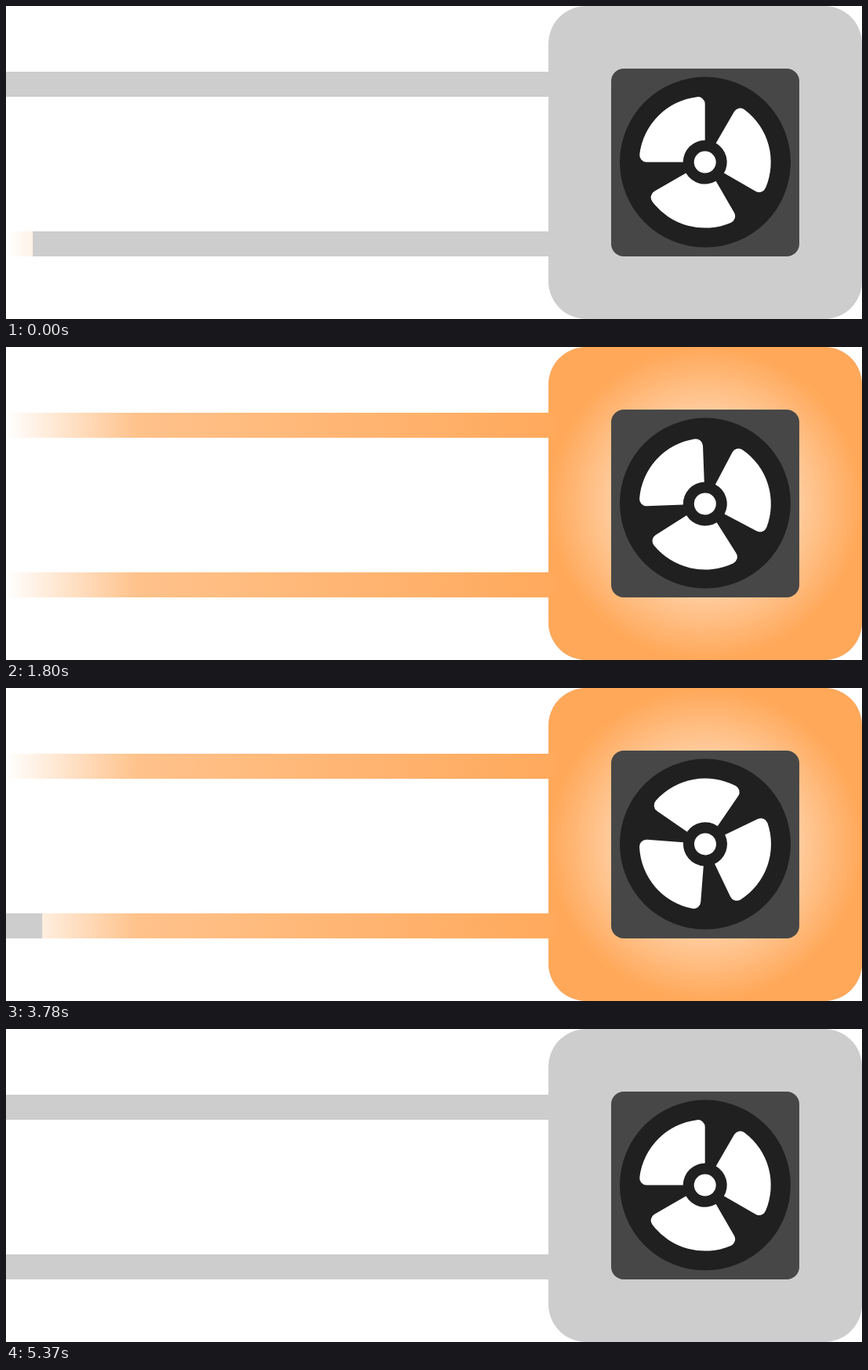
Recreate the animation shown at these times as an HTML page. Size 1092 by 400 pixels, loop 5.4 s.

```html
<!DOCTYPE html>
<html lang="en">
<head>
<meta charset="utf-8">
<title>Heat flow through a fan</title>
<style>
  html, body { margin: 0; width: 100%; height: 100%; overflow: hidden; background: #fff; }
  svg { display: block; width: 100%; height: 100%; }
</style>
</head>
<body>
<svg viewBox="0 0 1092 400">
  <defs>
    <linearGradient id="barHeat" gradientUnits="userSpaceOnUse" x1="0" x2="700" y1="0" y2="0">
      <stop offset="0" stop-color="#fff"/>
      <stop offset=".24" stop-color="#ffc28b"/>
      <stop offset="1" stop-color="#ffa95c"/>
    </linearGradient>
    <radialGradient id="boxHeat" gradientUnits="userSpaceOnUse" cx="892" cy="200" r="200">
      <stop offset="0" stop-color="#fff"/>
      <stop offset="1" stop-color="#ffa859"/>
    </radialGradient>
    <clipPath id="boxShape"><rect x="692" width="400" height="400" rx="48"/></clipPath>
    <path id="blade" d="M0-28V-74.5A9 9 0 0 0-10.1-83.4A84 84 0 0 0-83.4-10.1A9 9 0 0 0-74.5 0H-28A28 28 0 0 1 0-28Z"/>
  </defs>

  <g fill="#cdcdcd">
    <rect y="84" width="700" height="32"/>
    <rect y="288" width="700" height="32"/>
    <rect x="692" width="400" height="400" rx="48"/>
  </g>

  <g clip-path="url(#boxShape)"><rect id="box" height="400" fill="url(#boxHeat)"/></g>
  <rect id="top" y="84" height="32" fill="url(#barHeat)"/>
  <rect id="bottom" y="288" height="32" fill="url(#barHeat)"/>

  <rect x="772" y="80" width="240" height="240" rx="16" fill="#474747"/>
  <circle cx="892" cy="199.6" r="109" fill="#202020"/>
  <g id="fan" fill="#fff">
    <use href="#blade"/>
    <use href="#blade" transform="rotate(120)"/>
    <use href="#blade" transform="rotate(240)"/>
    <circle r="14"/>
  </g>
</svg>
<script>
const LOOP = 5400, LEAD = 30;
const part = id => document.getElementById(id);
const [box, topBar, bottomBar, fan] = ['box', 'top', 'bottom', 'fan'].map(part);

const progress = (t, start, length) => Math.min(1, Math.max(0, (t - start) / length));
const sweep = (t, start, length, from, to) => from + (to - from) * progress(t, start, length);

function span(rect, left, right) {
  rect.setAttribute('x', left);
  rect.setAttribute('width', Math.max(0, right - left));
}

// Four eased turns while hot, then one turn that coasts to rest.
function fanAngle(t) {
  const spin = progress(t, 1112, 2586), coast = progress(t, 3720, 1000);
  return 720 * (1 - Math.cos(Math.PI * spin)) + 360 * Math.sin(Math.PI / 2 * coast);
}

function draw(t) {
  span(bottomBar, sweep(t, 3742.5, 584, 0, 700), sweep(t, -27.5, 584, 0, 700));
  span(box, 692, t < 3000 ? sweep(t, 543, 500, 692, 1092) : sweep(t, 4283, 480, 1092, 692));
  span(topBar, sweep(t, 1043, 609, 700, 0), sweep(t, 4759, 609, 700, 0));
  fan.setAttribute('transform', `translate(892 200) rotate(${fanAngle(t)}) translate(-.3 -.4)`);
}

const begin = performance.now();
function tick() {
  // The first bar starts just before the loop point.
  draw((performance.now() - begin + LEAD) % LOOP - LEAD);
  requestAnimationFrame(tick);
}
tick();
</script>
</body>
</html>
```
